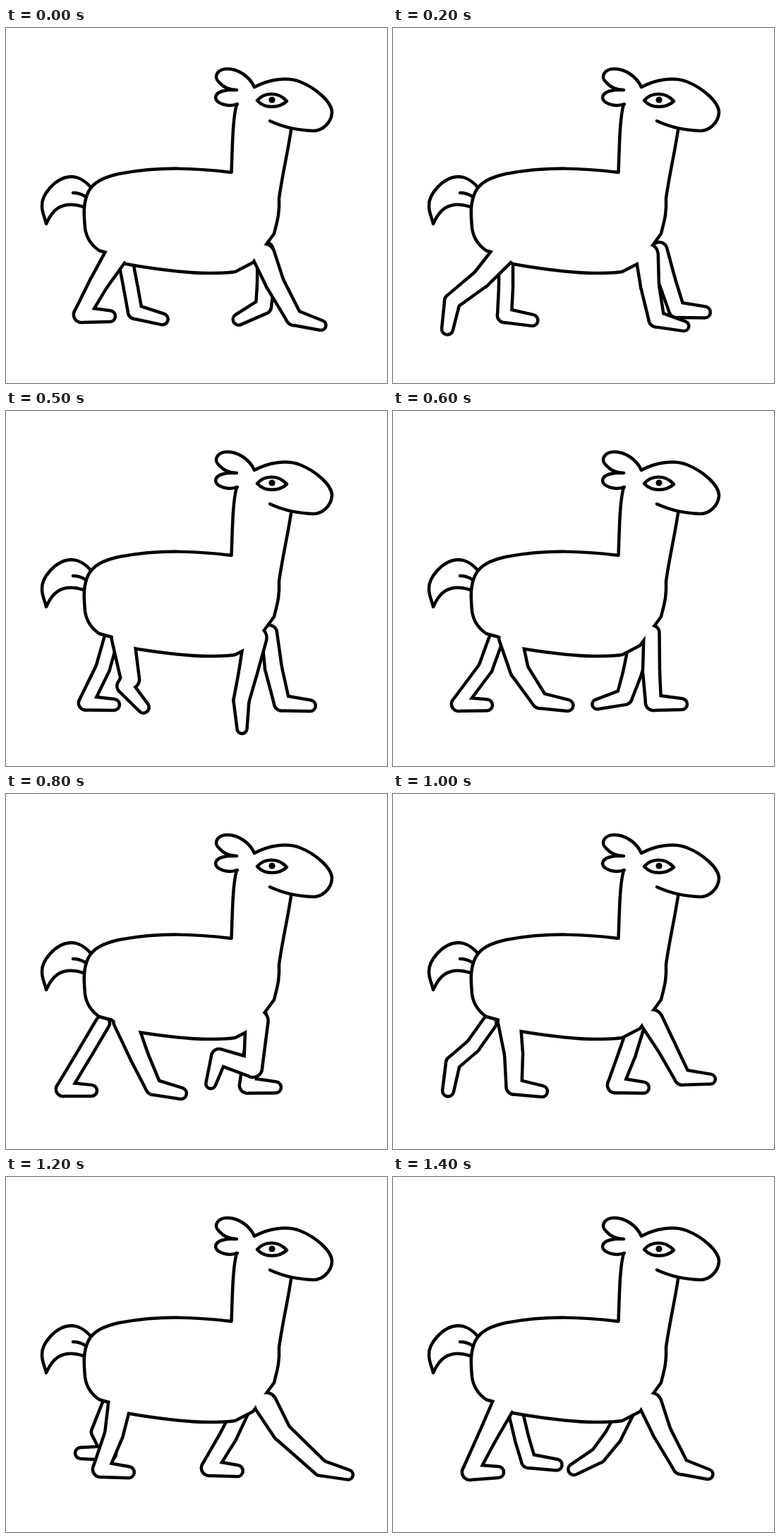
An HTML page with a canvas for the animation above (1500 ms loop, 540 px wide and 504 px high).

```html
<!DOCTYPE html>
<html lang="en">
<head>
<meta charset="utf-8">
<title>Walking llama</title>
<style>
  html, body { margin: 0; width: 100%; height: 100%; overflow: hidden; background: #fff; }
  canvas { display: block; }
</style>
</head>
<body>
<canvas id="stage" width="540" height="504"></canvas>
<script>
const ctx = document.getElementById("stage").getContext("2d");
const STEP = 100, STEPS = 15, LINE = 4.5, FOOT = 40;

// Each key: step, knee x y, ankle x y, foot angle in degrees.
// The hip follows the knee by the share "sway". Radii run from hip to toe.
const nearHind = { hip: [163, 322], sway: 0.2, radii: [16, 13, 11, 8], keys: [
  [0, 131, 363, 107, 407, 3],
  [2, 125, 356, 84, 388, 100],
  [4, 173, 394, 129, 370, 88],
  [6, 179, 368, 208, 411, 10],
  [8, 189, 373, 209, 416, 13],
  [12, 153, 365, 134, 415, 6],
  [14, 134, 368, 109, 419, 0]
] };
const farHind = { hip: [160, 325], sway: 0.5, radii: [10, 10, 10, 8], keys: [
  [0, 177, 370, 183, 403, 15],
  [4, 143, 366, 133, 413, 5],
  [6, 131, 365, 93, 416, 2],
  [8, 114, 364, 81, 419, 3],
  [10, 113, 358, 85, 382, 100],
  [12, 131, 362, 146, 392, 180],
  [14, 183, 373, 192, 403, 8]
] };
const nearFront = { hip: [358, 322], sway: 0.3, radii: [16, 13, 11, 7], keys: [
  [0, 381, 362, 408, 411, 16],
  [4, 347, 370, 339, 416, 12],
  [6, 339, 372, 328, 406, 165],
  [8, 350, 389, 302, 373, 107],
  [10, 387, 358, 410, 402, 4],
  [12, 391, 362, 446, 413, 14],
  [14, 381, 362, 408, 411, 16]
] };
const farFront = { hip: [367, 315], sway: 0.5, radii: [11, 12, 11, 8], keys: [
  [0, 368, 365, 365, 395, 152],
  [2, 388, 358, 402, 400, 5],
  [4, 392, 360, 413, 415, 8],
  [6, 366, 370, 369, 414, 3],
  [12, 315, 368, 288, 413, 6],
  [14, 312, 368, 291, 395, 150]
] };

const trunk = new Path2D(
  "M327 108C321 130 321 168 319.5 205C270 199 220 196 160 207" +
  "C138 212 124 219 117 232C108 250 111 270 112 284C114 299 122 309 132 316" +
  "L150 321L170 335L187 338C225 344 258 348 286 348C302 348 314 348 325 346" +
  "L350 333L380 292C384 275 388 265 387 242C391 212 399 178 404 145");
const details = new Path2D(
  // tail
  "M120 226C110 215 102 211 92 211C70 212 50 237 51 253C51 263 55 268 57 278" +
  "C64 262 76 243 110 254M95 234Q104 234 112 239" +
  // ears and head
  "M352 84C345 68 328 58 314 58C300 58 293 69 302 77C308 84 317 88 327 88" +
  "C312 87 297 90 297 99C298 107 314 113 328 108" +
  "M352 84C372 73 398 69 416 76C439 85 462 105 462 120C461 136 447 146 436 146" +
  "C414 145 396 142 374 132" +
  // eye
  "M356 103C366 91 386 90 398 104C387 114 367 115 356 103Z");

const lerp = (a, b, t) => a + (b - a) * t;

// Joints from hip to toe, with the keys repeating every cycle.
function pose({ hip, sway, keys }, step) {
  const i = keys.findLastIndex(key => key[0] <= step);
  const from = keys[i], to = keys[(i + 1) % keys.length];
  const span = (to[0] - from[0] + STEPS) % STEPS;
  const t = (step - from[0]) / span;
  const [, kneeX, kneeY, ankleX, ankleY, degrees] = from.map((v, n) => lerp(v, to[n], t));
  const angle = degrees * Math.PI / 180;
  return [
    [lerp(hip[0], kneeX, sway), hip[1]],
    [kneeX, kneeY],
    [ankleX, ankleY],
    [ankleX + FOOT * Math.cos(angle), ankleY + FOOT * Math.sin(angle)]
  ];
}

// A filled bone between two circles.
function bone([x1, y1], r1, [x2, y2], r2) {
  const angle = Math.atan2(y2 - y1, x2 - x1);
  const tangent = Math.acos((r1 - r2) / Math.hypot(x2 - x1, y2 - y1));
  ctx.beginPath();
  ctx.arc(x1, y1, r1, angle + tangent, angle - tangent + 2 * Math.PI);
  ctx.arc(x2, y2, r2, angle - tangent, angle + tangent);
  ctx.fill();
}

function fillLeg(leg, step, color, grow) {
  const joints = pose(leg, step);
  const radii = leg.radii.map(r => r + grow);
  ctx.fillStyle = color;
  for (let i = 0; i < 3; i++) bone(joints[i], radii[i], joints[i + 1], radii[i + 1]);
}
const legEdge = (leg, step) => fillLeg(leg, step, "#000", LINE / 2);
const legInside = (leg, step) => fillLeg(leg, step, "#fff", -LINE / 2);

function draw(step) {
  const far = [farHind, farFront], near = [nearHind, nearFront];
  if (step === 6) [far[1], near[1]] = [near[1], far[1]]; // the front legs cross here

  ctx.fillStyle = "#fff";
  ctx.fillRect(0, 0, 540, 504);
  ctx.lineWidth = LINE;
  ctx.lineCap = ctx.lineJoin = "round";

  for (const leg of far) {
    legEdge(leg, step);
    legInside(leg, step);
  }
  // Near legs merge with the trunk into one outline.
  for (const leg of near) legEdge(leg, step);
  ctx.fillStyle = "#fff";
  ctx.fill(trunk);
  ctx.stroke(trunk);
  for (const leg of near) legInside(leg, step);

  ctx.stroke(details);
  ctx.fillStyle = "#000";
  ctx.beginPath();
  ctx.arc(377, 102, 4.6, 0, Math.PI * 2);
  ctx.fill();
}

function tick() {
  draw(Math.floor(performance.now() / STEP) % STEPS);
  requestAnimationFrame(tick);
}
tick();
</script>
</body>
</html>
```
